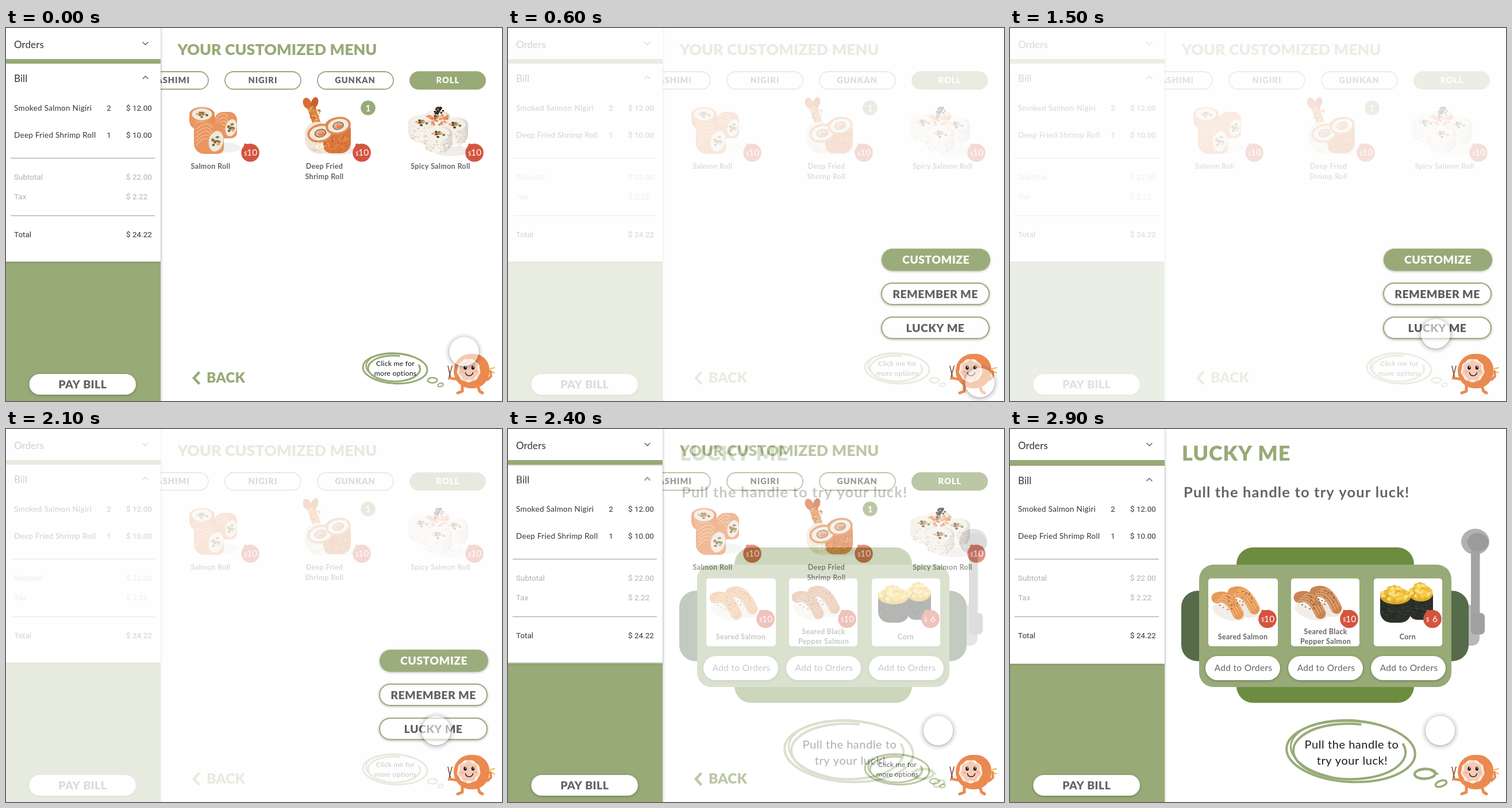
An HTML page with a canvas for the animation above (3000 ms loop, 863 by 649 pixels).

```html
<!DOCTYPE html>
<html lang="en">
<head>
<meta charset="utf-8">
<title>Sushi menu</title>
<style>
html, body { margin: 0; width: 100%; height: 100%; overflow: hidden; background: #fff; }
canvas { display: block; }
</style>
</head>
<body>
<canvas id="stage" width="863" height="649"></canvas>
<script>
const W = 863, H = 649, LOOP = 3000, STEP = 100, TAU = Math.PI * 2;
const GREEN = '#98aa77', GREY = '#646464', INK = '#353535', RED = '#d4543f';
const stage = document.getElementById('stage').getContext('2d');
let g = stage;

function layer(draw) {
  const c = document.createElement('canvas');
  c.width = W; c.height = H;
  g = c.getContext('2d');
  g.lineCap = g.lineJoin = 'round';
  draw();
  return c;
}

function text(s, x, y, size, o = {}) {
  g.font = `${o.w || 400} ${size}px ${o.font || 'Lato'}, sans-serif`;
  g.letterSpacing = (o.ls || 0) + 'px';
  g.textAlign = o.align || 'left';
  g.fillStyle = o.color || INK;
  g.fillText(s, x, y);
}
const mid = (s, x, y, size, o) => text(s, x, y, size, { align: 'center', ...o });

function box(x, y, w, h, r, fill, stroke) {
  g.beginPath();
  g.roundRect(x, y, w, h, r);
  if (fill) { g.fillStyle = fill; g.fill(); }
  if (stroke) { g.strokeStyle = stroke; g.lineWidth = 1.8; g.stroke(); }
}

function oval(x, y, rx, ry, fill, rot = 0) {
  g.beginPath();
  g.ellipse(x, y, rx, ry, rot, 0, TAU);
  g.fillStyle = fill;
  g.fill();
}

function arc(x, y, rx, ry, rot, from, to, width, color) {
  g.beginPath();
  g.ellipse(x, y, rx, ry, rot, from, to);
  g.lineWidth = width; g.strokeStyle = color;
  g.stroke();
}

function line(color, width, ...p) {
  g.beginPath();
  for (let i = 0; i < p.length; i += 2) g.lineTo(p[i], p[i + 1]);
  g.strokeStyle = color; g.lineWidth = width;
  g.stroke();
}

function curve(color, width, x0, y0, cx, cy, x1, y1) {
  g.beginPath();
  g.moveTo(x0, y0);
  g.quadraticCurveTo(cx, cy, x1, y1);
  g.strokeStyle = color; g.lineWidth = width;
  g.stroke();
}

function shadowed(blur, dy, alpha, draw) {
  g.save();
  g.shadowColor = `rgba(0,0,0,${alpha})`;
  g.shadowBlur = blur; g.shadowOffsetY = dy;
  draw();
  g.restore();
}

function random(seed) {
  return () => (seed = seed * 16807 % 2147483647) / 2147483647;
}

function specks(x, y, rx, ry, n, size, colors, seed) {
  const rnd = random(seed);
  for (let i = 0; i < n; i++) {
    const a = rnd() * TAU, d = Math.sqrt(rnd());
    oval(x + Math.cos(a) * d * rx, y + Math.sin(a) * d * ry, size, size * .8,
      colors[i % colors.length]);
  }
}

function badge(x, y, price) {
  g.beginPath();
  g.moveTo(x - 10, y - 16); g.lineTo(x - 13, y - 5); g.lineTo(x + 2, y - 14);
  g.fillStyle = RED; g.fill();
  oval(x, y, 15.8, 15.8, RED);
  text('$', x - 11, y + 4.5, 9.5, { color: '#fff' });
  text(price, x + (price.length > 1 ? -6 : 0), y + 5, 15.5, { color: '#fff', ls: .3 });
}

// Food

function roll(x, y, w, h, side, rice, core) {
  const shade = g.createLinearGradient(x - w, 0, x + w, 0);
  side.forEach((c, i) => shade.addColorStop(i / (side.length - 1), c));
  box(x - w, y - 4, w * 2, h, [8, 8, w * .8, w * .8], shade);
  oval(x, y, w, w * .58, shade);
  oval(x, y, w * .8, w * .46, rice);
  specks(x, y, w * .42, w * .24, 12, 2.5, core, 31);
}

function drapedRoll(x, y, w, h, core) {
  box(x, y, w, h, [16, 14, 10, 18], '#e9955f');
  for (let i = 0; i < 5; i++)
    curve('#f3bd95', 1.6, x + 4, y + 12 + i * 7, x + w * .45, y - 4 + i * 5, x + w * .6, y + 9 + i * 8);
  const fx = x + w * .74, fy = y + h * .6;
  oval(fx, fy, w * .24, h * .33, '#efe8dd', .25);
  specks(fx, fy, w * .12, h * .18, 13, 2.4, core, 17);
}

function salmonRoll() {
  const skin = ['#e88d55', '#f3ab7b', '#e38449'], core = ['#52683b', '#cf5b34', '#e9a06a', '#6f8a4c'];
  oval(378, 208, 30, 9, '#f1f0ee');
  roll(341, 150, 22, 32, skin, '#f1e9df', core);
  drapedRoll(362, 146, 40, 46, core);
  drapedRoll(327, 164, 52, 55, core);
}

function shrimpRoll() {
  const core = ['#ee8f5a', '#e0733f', '#f5be95'];
  oval(577, 213, 30, 8, '#efeeec');
  line('#d98540', 14, 532, 141, 540, 164);
  oval(524, 131, 7, 10, '#d76d35', -.4);
  oval(537, 130, 6, 10, '#c8602d', .3);
  specks(537, 148, 10, 15, 25, 2, ['#eab06f', '#c56f2e', '#df9554'], 5);
  box(520, 163, 44, 56, [22, 22, 16, 26], '#efe5d6');
  box(552, 156, 48, 62, [23, 22, 18, 14], '#d9773c');
  specks(576, 196, 22, 18, 60, 1.5, ['#e8985a', '#c76529'], 12);
  for (const [x, y, r] of [[547, 183, 19], [578, 170, 18]]) {
    oval(x, y, r + 4, r * .85, '#e08a4d', -.2);
    oval(x, y, r, r * .65, '#f1eae0', -.2);
    oval(x, y, r * .55, r * .38, '#5b5a48', -.2);
    oval(x, y, r * .48, r * .32, '#eda47c', -.2);
    specks(x, y, r * .35, r * .22, 8, 2, core, 3);
  }
  specks(540, 207, 13, 8, 20, 1.8, ['#fff8ec', '#e5d1b6'], 19);
}

function spicyRoll() {
  const rice = ['#eeeae3', '#f7f4ef', '#d6d1c8'], core = ['#5c8042', '#df6e41', '#f0a777', '#41502f'];
  const crumbs = ['#e4a47c', '#fff', '#d7cfc4'];
  oval(776, 214, 34, 9, '#efeeec');
  roll(750, 156, 23, 30, rice, '#f7f2e9', core);
  roll(723, 164, 23, 39, rice, '#f4efe6', core);
  roll(781, 168, 23, 39, rice, '#f4efe6', core);
  roll(752, 184, 25, 37, rice, '#f5f0e8', core);
  specks(723, 188, 18, 15, 32, 1.2, crumbs, 9);
  specks(783, 193, 18, 14, 32, 1.2, crumbs, 25);
  specks(752, 207, 22, 12, 40, 1.2, crumbs, 43);
  specks(751, 158, 19, 12, 46, 2.2, ['#ed905b', '#f6c6a4', '#e67a46'], 11);
  specks(753, 144, 8, 7, 26, 2, ['#2e2927', '#5b3429', '#1f1c1b'], 14);
}

function nigiri(x, y, top, streak, spots) {
  oval(x + 32, y + 50, 30, 13, '#f1eee8', .3);
  oval(x + 62, y + 46, 22, 12, '#eeeae3', .3);
  for (const [dx, dy] of [[28, 6], [0, 15]]) {
    const px = x + dx, py = y + dy;
    curve(top, 19, px + 11, py + 10, px + 32, py + 2, px + 48, py + 38);
    for (let i = 0; i < 4; i++)
      curve(streak, 1.5, px + 8 + i * 4, py + 17 - i * 4, px + 28 + i * 4, py + 9 - i * 3,
        px + 42 + i * 4, py + 42 - i * 3);
    specks(px + 31, py + 19, 18, 14, 15, 1.4, spots, 21 + dx);
  }
}

function corn() {
  for (const [x, y, w] of [[715, 286, 21], [671, 291, 27]]) {
    box(x - w, y, w * 2, 46, [4, 4, w * .7, w * .7], '#2b3029');
    specks(x, y + 26, w - 3, 17, 35, 1.3, ['#434a3f', '#1e221e'], 6);
    oval(x, y, w, 14, '#dba62b');
    specks(x, y - 4, w - 3, 13, 65, 3.6, ['#f6cd4f', '#edb936', '#fae07a'], 77);
  }
}

// Screens

function chevron(x, y, d) {
  line('#666', 1.6, x - 4.5, y - 2.2 * d, x, y + 2.2 * d, x + 4.5, y - 2.2 * d);
}

function sidebar(shift) {
  shadowed(5, 0, .3, () => box(0, -9, 269, H + 18, 0, GREEN));
  box(0, 0, 269, 54, 0, '#fff');
  shadowed(3, 1, .2, () => box(0, 62 + shift, 269, 344.5, 0, '#fff'));
  text('Orders', 14, 35, 17, { ls: .1 });
  text('Bill', 14, 93.5 + shift, 17, { ls: .1 });
  chevron(242.5, 27, 1);
  chevron(242.5, 86 + shift, -1);
  const num = { font: 'Roboto' }, pale = { font: 'Roboto', color: '#b0b0b0' };
  [['Smoked Salmon Nigiri', '2', '$ 12.00', 144], ['Deep Fried Shrimp Roll', '1', '$ 10.00', 191]]
    .forEach(([name, n, price, y]) => {
      text(name, 14, y, 13.5, { ls: .3 });
      mid(n, 179, y, 13.5, num);
      text(price, 209, y, 13.5, num);
    });
  [['Subtotal', '$ 22.00', 264, pale], ['Tax', '$ 2.22', 298, pale], ['Total', '$ 24.22', 364, num]]
    .forEach(([name, price, y, o]) => {
      text(name, 14, y, 13.5, o);
      text(price, 209, y, 13.5, o);
    });
  line('#b4b4b4', 1.4, 8.5, 226.5, 258.5, 226.5);
  line('#b4b4b4', 1.4, 8.5, 326.5, 258.5, 326.5);
  shadowed(4, 1, .3, () => box(40.5, 602, 185.5, 36, 18, '#fff'));
  mid('PAY BILL', 133.3, 626.5, 19.5, { w: 900, color: GREY, ls: .4 });
}

function bubble(x, y, s, rx, ry) {
  arc(x, y, rx, ry, .05, 0, TAU, 1.7 * s, GREEN);
  arc(x + s, y - s, rx - 2 * s, ry - .5 * s, .07, 1.9, 5.2, 1.3 * s, GREEN);
  arc(x - s, y, rx - 6 * s, ry - 2 * s, .02, -.3, 4.9, 1.7 * s, GREEN);
}

const menu = layer(() => {
  g.fillStyle = '#fff'; g.fillRect(0, 0, W, H);
  text('YOUR CUSTOMIZED MENU', 298.5, 46.5, 26.8, { w: 900, color: GREEN });
  const tab = { w: 900, color: GREY, ls: 1 };
  [220, 381, 542].forEach(x => box(x, 76, 132, 30.5, 15.2, '#fff', GREEN));
  box(702, 75.2, 133, 32, 16, GREEN);
  text('SASHIMI', 320, 96, 14.5, { ...tab, align: 'right' });
  mid('NIGIRI', 447, 96, 14.5, tab);
  mid('GUNKAN', 607.5, 96, 14.5, tab);
  mid('ROLL', 768.8, 96, 14.5, { ...tab, color: '#fff' });
  salmonRoll(); shrimpRoll(); spicyRoll();
  [425, 619, 815].forEach(x => badge(x, 217, '10'));
  oval(630, 139, 12.8, 12.8, GREEN);
  mid('1', 630, 144.5, 15.5, { w: 700, color: '#fff' });
  const label = { w: 700, color: GREY, ls: .35 };
  mid('Salmon Roll', 356, 244.5, 12.5, label);
  mid('Deep Fried', 554, 245, 12.5, label);
  mid('Shrimp Roll', 554, 263, 12.5, label);
  mid('Spicy Salmon Roll', 756, 244.5, 12.5, label);
  g.lineCap = 'butt'; g.lineJoin = 'miter';
  line(GREEN, 4.5, 336.5, 598.5, 327, 609, 336.5, 619.5);
  g.lineCap = g.lineJoin = 'round';
  text('BACK', 349, 616.5, 24.5, { w: 900, color: GREEN, ls: .2 });
  bubble(677, 592.5, 1.8, 56, 26);
  mid('Click me for', 677.5, 588, 12.3, { color: '#111', ls: .2 });
  mid('more options', 677.5, 605, 12.3, { color: '#111', ls: .2 });
  arc(742, 613, 8.5, 4.5, 0, 0, TAU, 2.5, GREEN);
  arc(756, 621, 5, 3, -.3, 0, TAU, 2, GREEN);
  sidebar(0);
});

const options = layer(() => {
  const big = { w: 900, color: '#5c5c5c', ls: .4 };
  shadowed(4, 1, .3, () => box(650, 384, 189, 38.5, 19.2, GREEN));
  mid('CUSTOMIZE', 744.5, 410.3, 19.5, { ...big, color: '#fff' });
  [['REMEMBER ME', 444], ['LUCKY ME', 503.3]].forEach(([s, y]) => {
    shadowed(4, 1, .3, () => box(649, y - 1, 189, 39, 19.5, GREEN));
    box(651, y + 1, 185, 35, 17.5, '#fff');
    mid(s, 743.5, y + 25.7, 19.5, big);
  });
});

const lucky = layer(() => {
  g.fillStyle = '#fff'; g.fillRect(0, 0, W, H);
  text('LUCKY ME', 299, 54.5, 36, { w: 900, color: GREEN, ls: .9 });
  text('Pull the handle to try your luck!', 302, 118.5, 25.5, { w: 700, color: GREY, ls: 1.15 });
  box(770, 306, 47, 71, 13, '#b8b8b8');
  oval(809.5, 196, 24.5, 22.5, '#b1b1b1');
  box(802, 205, 15.5, 130, 3, '#a3a3a3');
  oval(814, 197, 18.5, 16, '#9b9b9b');
  box(802, 320, 24, 37.5, 7, '#a0a0a0');
  box(298, 281.5, 500, 122.5, 28, '#566b49');
  box(394, 206, 309, 270.5, 29, '#6c8c40');
  box(329, 236, 439, 213, 25, GREEN);
  [[345, 121], [489, 119], [633, 119]].forEach(([x, w]) => box(x, 260, w, 118, 5, '#fff'));
  nigiri(349, 269, '#e69a58', '#f2bd86', ['#a85b2a', '#ca7739']);
  nigiri(492, 268, '#c98452', '#e0ad80', ['#85502f', '#a8653a']);
  corn();
  badge(448, 330.5, '10'); badge(590, 330.5, '10'); badge(735, 330.5, '6');
  const label = { w: 700, color: GREY, ls: .35 };
  mid('Seared Salmon', 405, 365.5, 12.5, label);
  mid('Seared Black', 549, 357, 12.5, label);
  mid('Pepper Salmon', 549, 374, 12.5, label);
  mid('Corn', 692, 365.5, 12.5, label);
  [340, 484, 628].forEach(x => {
    shadowed(4, 1, .3, () => box(x, 395, 130, 42, 21, '#fff'));
    mid('Add to Orders', x + 66, 421.3, 15.5, { color: GREY, ls: .3 });
  });
  bubble(593, 561, 2.4, 112, 53);
  mid('Pull the handle to', 594.5, 555.5, 20, { color: '#1c1c1c', ls: .55 });
  mid('try your luck!', 595.5, 583.5, 20, { color: '#1c1c1c', ls: .55 });
  arc(722, 600, 18, 8.5, -.05, 0, TAU, 4.5, GREEN);
  line(GREEN, 3.5, 734, 595, 744, 600);
  arc(750, 617, 10, 5, -.35, 0, TAU, 3.5, GREEN);
  sidebar(2);
});

function blob(x, y, r, bump, n, fill) {
  g.beginPath();
  for (let a = 0; a < TAU; a += .05) {
    const d = r + bump * Math.sin(a * n);
    g.lineTo(x + Math.cos(a) * d, y + Math.sin(a) * d);
  }
  g.fillStyle = fill; g.fill();
}

const mascot = layer(() => {
  const skin = '#ea8a50';
  line('#f2b64c', 2, 842, 593, 850, 591);
  line('#f2b64c', 2, 844, 598, 850, 600);
  line(skin, 4, 838, 612, 844, 606, 843, 597);
  line(skin, 5, 794, 620, 794, 632, 786, 635);
  line(skin, 5, 820, 620, 824, 632, 829, 635);
  line('#7a4430', 1.5, 769, 588, 774, 610);
  line('#7a4430', 1.5, 776, 588, 770, 611);
  line(skin, 4.5, 784, 611, 772, 609);
  box(779, 567, 62, 60, [29, 27, 29, 30], skin);
  blob(805, 596, 20, .6, 9, '#fdf0e6');
  blob(805, 596, 17, 1.3, 7, '#f5cbb6');
  for (const x of [799, 812.5]) {
    oval(x, 591, 2.8, 3.6, '#241d1b');
    oval(x + .8, 589.7, 1, 1.1, '#fff');
  }
  oval(794, 598, 2.5, 1.8, '#f0ac98');
  oval(817, 597, 2.5, 1.8, '#f0ac98');
  arc(806, 599, 6.5, 6, 0, .1, Math.PI - .1, 1.6, '#3a2420');
});

// Motion: each row is a time followed by its values

const pointer = [[0, 797, 563], [100, 816, 601], [200, 821, 617], [900, 821, 617], [1200, 815, 608],
  [1300, 805, 592], [1400, 786, 566], [1500, 740.5, 532], [1600, 746, 526], [1700, 748.5, 524.7]];
const veil = [[200, 0], [300, .12], [400, .5], [500, .82], [600, .97], [700, 1],
  [1900, 1], [2000, .99], [2100, .96], [2200, .45], [2300, 0]];
const reveal = [[2200, 0], [2300, .015], [2400, .35], [2500, .7], [2600, .9], [2700, .97], [2800, 1]];

function at(track, t) {
  const i = track.findIndex(k => k[0] > t);
  if (i < 0) return track[track.length - 1].slice(1);
  if (i === 0) return track[0].slice(1);
  const a = track[i - 1], b = track[i], p = (t - a[0]) / (b[0] - a[0]);
  return a.slice(1).map((v, j) => v + (b[j + 1] - v) * p);
}

function cursor(x, y) {
  const halo = g.createRadialGradient(x, y + 1, 25, x, y + 1, 34);
  halo.addColorStop(0, 'rgba(0,0,0,.25)');
  halo.addColorStop(.35, 'rgba(0,0,0,.09)');
  halo.addColorStop(1, 'rgba(0,0,0,0)');
  g.beginPath();
  g.arc(x, y, 35, 0, TAU);
  g.arc(x, y, 25.5, 0, TAU);
  g.fillStyle = halo;
  g.fill('evenodd');
  oval(x, y, 25.8, 25.8, 'rgba(255,255,255,.55)');
}

function put(image, alpha) {
  g.globalAlpha = alpha;
  g.drawImage(image, 0, 0);
  g.globalAlpha = 1;
}

function frame(now) {
  const t = Math.floor(now % LOOP / STEP) * STEP;
  const [v] = at(veil, t), [r] = at(reveal, t);
  g = stage;
  put(menu, 1);
  g.fillStyle = `rgba(254,254,254,${.81 * v})`;
  g.fillRect(0, 0, W, H);
  put(options, v);
  put(lucky, r);
  put(mascot, 1);
  cursor(...at(pointer, t));
}

const start = performance.now();
function tick() {
  frame(performance.now() - start);
  requestAnimationFrame(tick);
}
tick();
</script>
</body>
</html>
```
